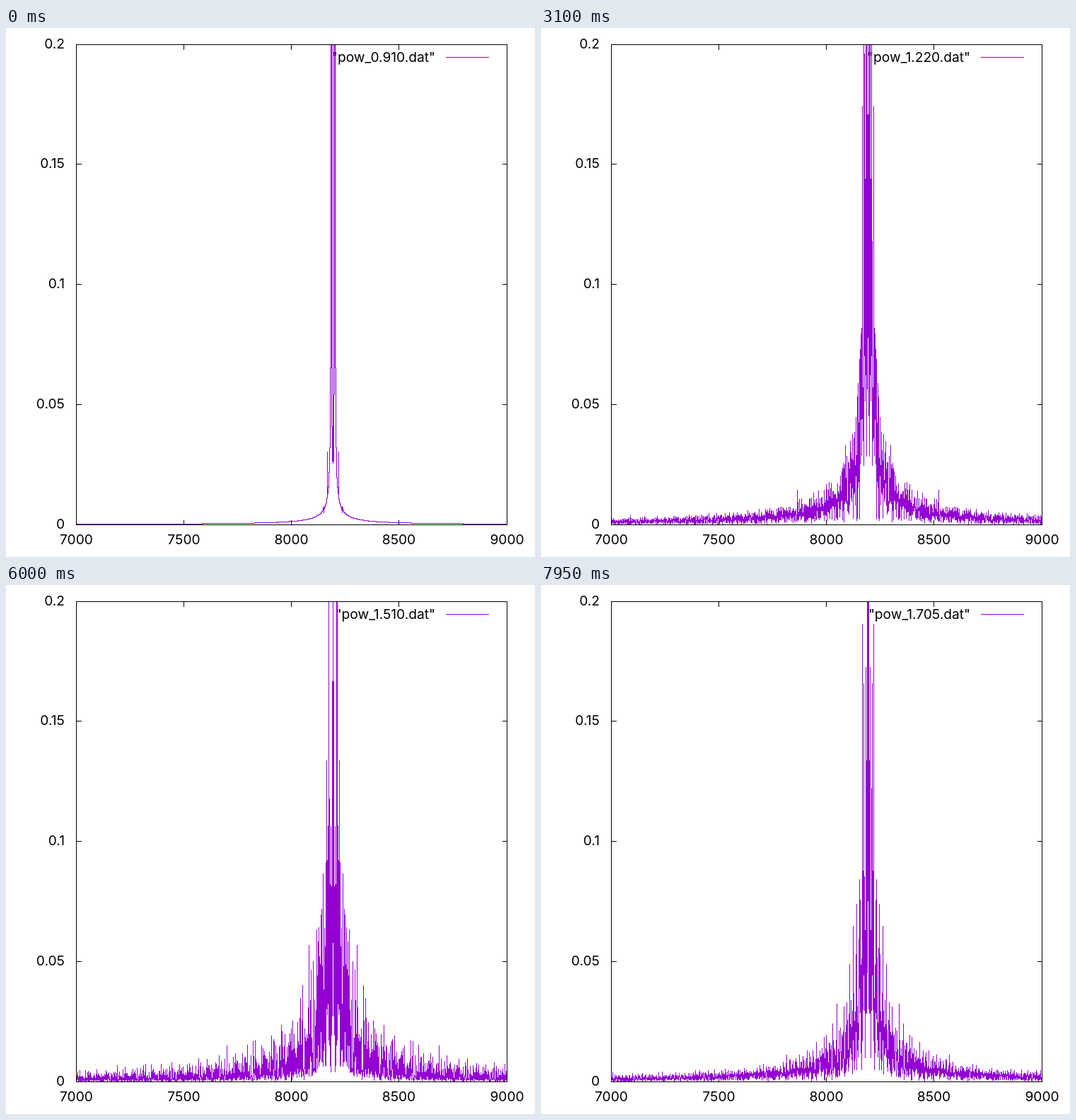
Recreate the animation shown at these times as an HTML page with a canvas. Size 748 px wide and 748 px high, loop 8 s.

```html
<!DOCTYPE html>
<html lang="en">
<head>
<meta charset="utf-8">
<title>Pendulum spectrum</title>
<style>
  html, body { margin: 0; width: 100%; height: 100%; overflow: hidden; background: #fff; }
  svg, canvas { position: absolute; left: 0; top: 0; width: 748px; height: 748px; display: block; }
  text { font: 19.2px Inter, "Open Sans", sans-serif; fill: #000; }
  path { fill: none; stroke: #000; shape-rendering: crispEdges; }
  #sample { stroke: #9400d3; }
</style>
</head>
<body>
<svg viewBox="0 0 748 748">
  <path id="axes"/>
  <path id="sample" d="M621.5 41.5H682.5"/>
  <g id="labels"></g>
  <text id="key" x="607" y="47.5" text-anchor="end"></text>
</svg>
<canvas id="plot" width="748" height="748"></canvas>
<script>
const LEFT = 99, RIGHT = 708, TOP = 23, BOTTOM = 702;
const X_MIN = 7000, X_MAX = 9000, Y_MAX = 0.2;
const STEP_MS = 50, STEPS = 160, G_START = 0.91, G_STEP = 0.005;
const SIZE = 16384, CENTRE = SIZE / 2, DT = 0.005;
const DRIVE = 2 / 3, DAMPING = 0.5, PHASE = 0.5, SCALE = 0.5;
const WARM_UP = Math.round(12 * 2 * Math.PI / DRIVE / DT);

const byId = id => document.getElementById(id);
const toX = v => LEFT + (v - X_MIN) / (X_MAX - X_MIN) * (RIGHT - LEFT);
const toY = v => BOTTOM - v / Y_MAX * (BOTTOM - TOP);

function drawAxes() {
  let d = `M${LEFT}.5 ${TOP}.5H${RIGHT}.5V${BOTTOM}.5H${LEFT}.5Z`;
  const label = (x, y, anchor, value) => {
    const text = document.createElementNS(byId("key").namespaceURI, "text");
    text.setAttribute("x", x);
    text.setAttribute("y", y);
    text.setAttribute("text-anchor", anchor);
    text.textContent = value;
    byId("labels").append(text);
  };
  for (let v = X_MIN; v <= X_MAX; v += 500) {
    const x = Math.floor(toX(v)) + 0.5;
    d += `M${x} ${BOTTOM}.5v-7M${x} ${TOP}.5v7`;
    label(x, 730, "middle", v);
  }
  for (let i = 0; i <= 4; i++) {
    const y = Math.floor(toY(i * 0.05)) + 0.5;
    d += `M${LEFT}.5 ${y}h7M${RIGHT}.5 ${y}h-7`;
    label(83, y + 5.5, "end", +(i * 0.05).toFixed(2));
  }
  byId("axes").setAttribute("d", d);
}

// Angle of a damped, driven pendulum, wrapped to one turn.
function swing(g) {
  const out = new Float64Array(SIZE), turn = 2 * Math.PI;
  let angle = 0, speed = 0;
  for (let i = -WARM_UP; i < SIZE; i++) {
    const push = g * Math.cos(DRIVE * i * DT + PHASE);
    speed += DT * (push - Math.sin(angle) - DAMPING * speed);
    angle += DT * speed;
    if (angle > Math.PI) angle -= turn;
    else if (angle < -Math.PI) angle += turn;
    if (i >= 0) out[i] = angle + Math.PI;
  }
  return out;
}

const cosTable = new Float64Array(SIZE / 2), sinTable = new Float64Array(SIZE / 2);
for (let i = 0; i < SIZE / 2; i++) {
  cosTable[i] = Math.cos(2 * Math.PI * i / SIZE);
  sinTable[i] = -Math.sin(2 * Math.PI * i / SIZE);
}

// In-place radix-2 Fourier transform.
function transform(re, im) {
  for (let i = 1, j = 0; i < SIZE; i++) {
    let bit = SIZE >> 1;
    for (; j & bit; bit >>= 1) j ^= bit;
    j ^= bit;
    if (i < j) [re[i], re[j]] = [re[j], re[i]];
  }
  for (let half = 1; half < SIZE; half *= 2) {
    const stride = SIZE / (2 * half);
    for (let start = 0; start < SIZE; start += 2 * half) {
      for (let k = 0; k < half; k++) {
        const a = start + k, b = a + half;
        const c = cosTable[k * stride], s = sinTable[k * stride];
        const x = re[b] * c - im[b] * s, y = re[b] * s + im[b] * c;
        re[b] = re[a] - x;
        im[b] = im[a] - y;
        re[a] += x;
        im[a] += y;
      }
    }
  }
}

const cache = [];
function spectrum(step) {
  if (!cache[step]) {
    const re = swing(G_START + step * G_STEP), im = new Float64Array(SIZE);
    transform(re, im);
    cache[step] = Float32Array.from({ length: CENTRE - X_MIN + 1 },
      (_, k) => SCALE * Math.hypot(re[k], im[k]) / SIZE);
  }
  return cache[step];
}

const ctx = byId("plot").getContext("2d");
ctx.fillStyle = "#9400d3";
ctx.beginPath();
ctx.rect(LEFT + 1, TOP + 1, RIGHT - LEFT - 1, BOTTOM - TOP - 1);
ctx.clip();

function column(x, y0, y1) {
  ctx.fillRect(x, Math.min(y0, y1), 1, Math.abs(y1 - y0) + 1);
}

// Hard-edged polyline: neighbouring points share a column or sit one apart.
function drawCurve(values) {
  ctx.clearRect(0, 0, 748, 748);
  let px, py;
  for (let i = X_MIN; i <= X_MAX; i++) {
    const x = Math.round(toX(i));
    const y = Math.round(toY(values[Math.abs(i - CENTRE)]));
    if (px === x) column(x, py, y);
    else if (px !== undefined) {
      const mid = Math.round((py + y) / 2);
      column(px, py, mid);
      column(x, mid, y);
    }
    px = x;
    py = y;
  }
}

let shown = -1;
function render(now) {
  const step = Math.floor(now / STEP_MS) % STEPS;
  if (step !== shown) {
    shown = step;
    byId("key").textContent = `"pow_${(G_START + step * G_STEP).toFixed(3)}.dat"`;
    drawCurve(spectrum(step));
  }
}

drawAxes();
let origin;
function tick(now) {
  origin ??= now;
  render(Math.max(0, now - origin));
  requestAnimationFrame(tick);
}
render(0);
requestAnimationFrame(tick);
</script>
</body>
</html>
```
